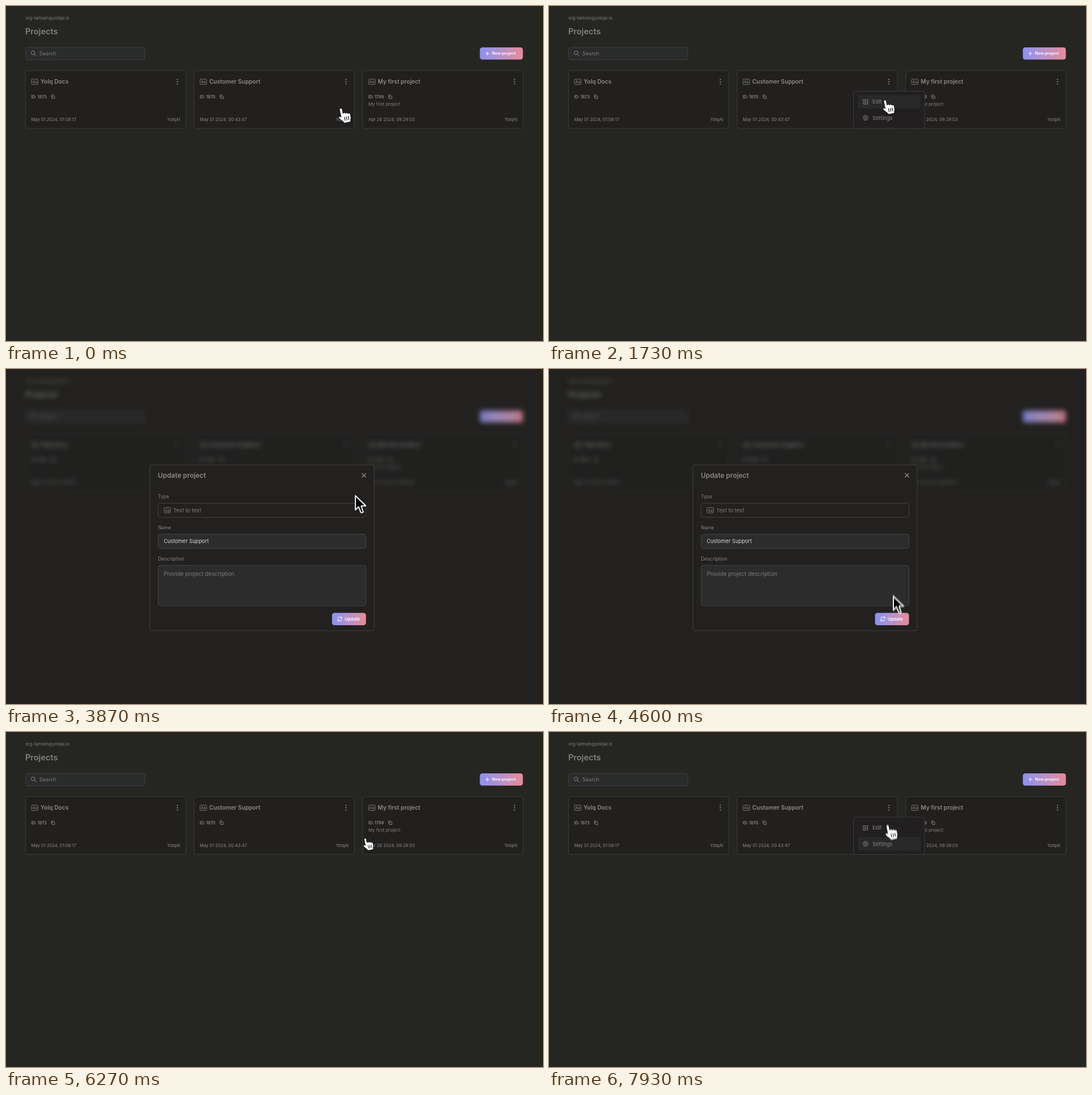
Recreate the animation shown at these times as an HTML page. Size 948 px wide and 591 px high, loop 8 s.

```html
<!DOCTYPE html>
<html lang="en">
<head>
<meta charset="utf-8">
<title>Projects</title>
<style>
html, body { margin: 0; width: 100%; height: 100%; overflow: hidden; background: #252622; }
svg { display: block; width: 100vw; height: 100vh; }
text { font-family: Inter, "Open Sans", sans-serif; }
.line { fill: none; stroke-linecap: round; stroke-linejoin: round; }
</style>
</head>
<body>
<svg id="stage" viewBox="0 0 948 591">
  <defs>
    <linearGradient id="brand">
      <stop offset="0" stop-color="#8a91f2"/>
      <stop offset=".5" stop-color="#b891ca"/>
      <stop offset="1" stop-color="#e98a98"/>
    </linearGradient>
    <filter id="smear" x="-50%" y="-50%" width="200%" height="200%">
      <feGaussianBlur id="smearBlur" stdDeviation="0"/>
    </filter>
  </defs>
  <rect id="back" width="948" height="591"/>
  <g id="page"></g>
  <g id="menu"></g>
  <rect id="shade" width="948" height="591" fill="#232220"/>
  <g id="modal"></g>
  <g id="cursor">
    <g id="hand" transform="rotate(-12)">
      <path fill="#fff" stroke="#111" d="M-2.6 1.5C-2.6-1.4 2.2-1.4 2.2 1.5V9.5C2.6 7.6 6.4 7.8 6.6 10C7.4 8.6 10.6 9 10.8 11.2C12 10.2 14.4 11 14.4 13.2V18.5C14.4 21 12.4 22.5 12.4 26.5H.8C.4 23.5-4 20.5-6.2 16.6C-8 13.6-5 11.8-2.6 14.6Z"/>
      <path class="line" stroke="#111" stroke-width="1.2" d="M3.2 16V22M6.6 16V22M10 16V22"/>
    </g>
    <path id="arrow" fill="#050505" stroke="#fff" stroke-width="1.9" stroke-linejoin="round" d="M.8 1.5V26.5L6.4 21.2L10.2 30.4Q11.8 33 14.6 30.2L11 19.8L19 19.3Z"/>
  </g>
</svg>
<script>
const LOOP = 8000;
const GREY = '#868583';
const $ = id => document.getElementById(id);

// Text is placed by the middle of its capitals.
const label = (x, mid, size, str, fill = GREY, weight = 400, anchor = 'start') =>
  `<text x="${x}" y="${mid + size * 0.36}" font-size="${size}" font-weight="${weight}" fill="${fill}" text-anchor="${anchor}">${str}</text>`;
const box = (x, y, w, h, r, fill, stroke = 'none') =>
  `<rect x="${x}" y="${y}" width="${w}" height="${h}" rx="${r}" fill="${fill}" stroke="${stroke}"/>`;
const line = (x, y, d, stroke = GREY, width = 1) =>
  `<path class="line" transform="translate(${x} ${y})" d="${d}" stroke="${stroke}" stroke-width="${width}"/>`;

const typeIcon = (x, mid) =>
  box(x, mid - 4.6, 11.5, 9.2, 1.2, 'none', '#787775') + label(x + 5.75, mid, 6.4, 'Aa', GREY, 500, 'middle');
const copyIcon = (x, mid) =>
  line(x, mid, 'M2-1H6V3.4H2ZM.2 1.4V-3.2H4.2', GREY, .9);
const circle = (x, y, r) => `<circle cx="${x}" cy="${y}" r="${r}" fill="none" stroke="${GREY}"/>`;

function card(i, { title, id, date, note = '' }) {
  const x = 34.5 + i * 297.6;
  const dots = [-4, 0, 4].map(d => `<circle cx="${x + 268}" cy="${133.6 + d}" r="1" fill="#9a9997"/>`).join('');
  return box(x, 114, 282.8, 102, 4, '#21201f', '#3b3a39') +
    typeIcon(x + 10.5, 133.7) + label(x + 26.6, 133.7, 10.2, title, '#8b8a88', 600) + dots +
    label(x + 10, 160, 7.1, 'ID: ' + id, '#8b8a88', 600) + copyIcon(x + 45.5, 160) +
    label(x + 10, 173.2, 7.9, note, '#807f7d') +
    label(x + 10, 200, 7.6, date, '#8b8a88') +
    label(x + 273, 200, 7.6, 'YolqAI', '#8b8a88', 400, 'end');
}

const cards = [
  { title: 'Yolq Docs', id: 1873, date: 'May 01 2024, 01:08:17' },
  { title: 'Customer Support', id: 1870, date: 'May 01 2024, 00:43:47' },
  { title: 'My first project', id: 1799, date: 'Apr 28 2024, 09:29:03', note: 'My first project' }
];

$('page').innerHTML =
  label(34.3, 21.5, 7.45, 'org-tamsen@yolqai.io', '#7d7d7a') +
  label(34, 45, 14.5, 'Projects', '#80807d', 600) +
  box(34.5, 73, 210.5, 21.8, 4, '#2a2b2b', '#3e3f3e') +
  line(47.6, 82.6, 'M3.3 0A3.3 3.3 0 1 1-3.3 0A3.3 3.3 0 1 1 3.3 0M2.5 2.5L6 6') +
  label(58.8, 84, 9.1, 'Search', '#7b7b79') +
  box(836.5, 73, 76, 21.6, 4.5, 'url(#brand)') +
  line(849.8, 83.8, 'M-3 0H3M0-3V3', '#fff', 1.1) +
  label(857.8, 83.8, 7.2, 'New project', '#f7f3fa', 700) +
  cards.map((c, i) => card(i, c)).join('');

$('menu').innerHTML =
  box(537.5, 150.2, 125.7, 65.8, 4, '#211f1f', '#3b3a39') +
  `<rect id="hover" x="545" width="111.5" height="23.6" rx="4" fill="#2a292a"/>` +
  line(559, 169, 'M0-3.5H-4V4H3.5V0M-1.5 1.5L-1-1L3-4.5L4.8-2.8L1 1Z') +
  label(571, 169, 9.3, 'Edit') +
  line(559, 197.3, 'M-2-4H2L4.3 0L2 4H-2L-4.3 0Z') + circle(559, 197.3, 1.7) +
  label(571, 197.3, 9.2, 'Settings');

$('modal').innerHTML =
  box(254, 169.2, 396, 292.6, 4, '#22211f', '#42413f') +
  label(268, 188, 11.9, 'Update project', '#8b8a88', 600) +
  line(631.8, 187.5, 'M-3.3-3.3L3.3 3.3M3.3-3.3L-3.3 3.3', '#a3a2a0', 1.1) +
  label(268.3, 225.5, 8.3, 'Type') +
  box(268.5, 236.7, 367, 25, 4, '#22211f', '#434240') +
  typeIcon(279, 249.2) + label(295.3, 249.2, 9.4, 'Text to text', '#7e7d7b') +
  label(268.3, 280.3, 8.3, 'Name') +
  box(268.5, 291.4, 367, 25, 4, '#2c2c2c', '#434342') +
  label(278.4, 304, 9.2, 'Customer Support', '#dad9d7') +
  label(268.3, 335, 8.6, 'Description') +
  box(268.5, 346.3, 367, 71.5, 4, '#2c2c2c', '#434342') +
  label(278.4, 361, 9.8, 'Provide project description', '#7c7b79') +
  box(575.5, 430.3, 60, 21.7, 4.5, 'url(#brand)') +
  line(589.3, 441, 'M-3.5-.5A3.6 3.6 0 0 1 3-2.3M3.5-4V-1.6H1.2M3.5.5A3.6 3.6 0 0 1-3 2.3M-3.5 4V1.6H-1.2', '#fff') +
  label(598, 441, 7.6, 'Update', '#f7f3fa', 700);

// Pointer stops: time, x, y
const stops = [
  [0, 591, 181], [150, 591, 181], [900, 598, 133], [1200, 598, 133], [1710, 593, 166.5],
  [2850, 593, 166.5], [3670, 616, 222], [3960, 616, 222], [4970, 605, 442],
  [5050, 605, 442], [5865, 625, 187], [6050, 634, 188], [6380, 634, 188],
  [7050, 598, 133], [7500, 598, 133], [8360, 597, 196]
];
const clicks = [950, 1860, 4990, 6240, 7110];

const clamp = v => Math.max(0, Math.min(1, v));
const ease = p => p < .5 ? 4 * p ** 3 : 1 - 4 * (1 - p) ** 3;
const within = (t, a, b) => t >= a && t < b;
const show = (id, on) => $(id).style.display = on ? '' : 'none';

function pointer(t) {
  const i = Math.max(1, stops.findIndex(s => s[0] > t));
  const [t0, x0, y0] = stops[i - 1], [t1, x1, y1] = stops[i];
  const p = ease(clamp((t - t0) / (t1 - t0)));
  return { x: x0 + (x1 - x0) * p, y: y0 + (y1 - y0) * p };
}

function draw(t) {
  const open = clamp((t - 1950) / 200) * (1 - clamp((t - 6050) / 150));
  $('back').setAttribute('fill', `rgb(${37 - 2 * open},${38 - 4 * open},${34 - 2 * open})`);
  $('page').style.filter = open ? `blur(${4.2 * open}px)` : 'none';
  $('shade').setAttribute('opacity', .22 * open);
  $('modal').setAttribute('opacity', open);
  show('modal', open > 0);

  show('menu', within(t, 1000, 1950) || t >= 7150);
  show('hover', within(t, 1350, 1950) || t >= 7480);
  $('hover').setAttribute('y', t >= 7620 ? 185.5 : 157.2);

  const { x, y } = pointer(t), next = pointer(t + 8), prev = pointer(Math.max(0, t - 8));
  const press = Math.max(...clicks.map(c => clamp(1.5 - Math.abs(t - c) / 100)));
  const onTarget = y > 430 || (x > 627 && y < 200);
  const isHand = open < .5 || onTarget;
  show('hand', isHand);
  show('arrow', !isHand);
  $('cursor').setAttribute('transform', `translate(${x} ${y}) scale(${1 - .18 * press})`);
  const sx = Math.abs(next.x - prev.x) * .3, sy = Math.abs(next.y - prev.y) * .3;
  const moving = Math.max(sx, sy) > .25;
  $('smearBlur').setAttribute('stdDeviation', `${Math.max(.1, sx)} ${Math.max(.1, sy)}`);
  if (moving) $('cursor').setAttribute('filter', 'url(#smear)');
  else $('cursor').removeAttribute('filter');
}

const start = performance.now();
function tick() {
  draw((performance.now() - start) % LOOP);
  requestAnimationFrame(tick);
}
tick();
</script>
</body>
</html>
```
